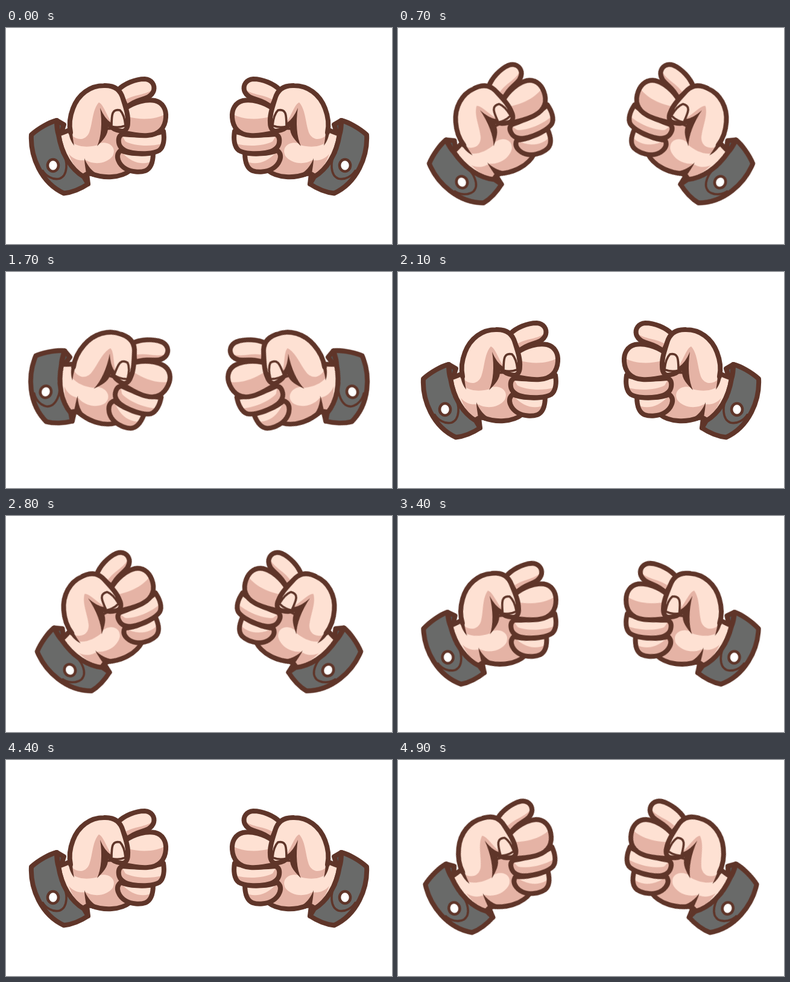
Recreate the animation shown at these times as an HTML page. Size 640 by 360 pixels, loop 5000 ms.

```html
<!DOCTYPE html>
<html lang="en">
<head>
<meta charset="utf-8">
<title>Two fists</title>
<style>
  html, body { margin: 0; width: 100%; height: 100%; overflow: hidden; background: #fff; }
  svg { display: block; width: 100vw; height: 100vh; }
  .ink { fill: none; stroke: #5f3529; stroke-width: 8; stroke-linejoin: round; stroke-linecap: round; }
  .thin { stroke-width: 3.6; }
  .crease { fill: #5f3529; }
  .light { fill: #fee1d3; }
  .shade { fill: #e5b3a5; }
  .cuff { fill: #696a69; }
  .lining { fill: #555554; }
  .button { fill: #fff; stroke: #5f3529; stroke-width: 4.6; }

  /* The small negative delay keeps samples off the step edges. */
  .fist { transform-origin: 155px 180px; animation: shake 5s -1ms infinite; }

  /* Wind up, slam down, hold, ease back: 5 degrees per 100 ms, slam 15. */
  @keyframes shake {
    0%, 46%  { transform: rotate(0deg);   animation-timing-function: steps(6, end); }
    12%, 58% { transform: rotate(-30deg); animation-timing-function: steps(6, end); }
    24%, 70% { transform: rotate(0deg);   animation-timing-function: steps(2, end); }
    28%, 74% { transform: rotate(30deg);  animation-timing-function: step-end; }
    30%, 76% { transform: rotate(30deg);  animation-timing-function: steps(6, end); }
    42%, 88% { transform: rotate(0deg);   animation-timing-function: step-end; }
    92%      { transform: rotate(0deg);   animation-timing-function: steps(4, end); }
    100%     { transform: rotate(-20deg); }
  }
</style>
</head>
<body>
<svg viewBox="0 0 640 360">
  <g class="fist" id="left"></g>
  <g transform="matrix(-1 0 0 1 640 0)"><g class="fist" id="right"></g></g>
</svg>
<script>
  const path = (cls, d) => `<path class="${cls}" d="${d}"/>`;

  // Filled shape, inner tones, then the outline on top.
  const part = (fill, d, inner = '') => path(fill, d) + inner + path('ink', d);
  const finger = (d, light) => part('shade', d, path('light', light));

  const lining =
    part('lining', 'M84 154L96 161L92 174L86 178Z') +
    part('lining', 'M116 236L134 243L136 260L128 250Z');

  const palm = part('light',
    'M87 177C96 174 102 172 108 168L190 165L205 238C190 250 162 251 142 243' +
    'C136 242 131 244 128 248C108 236 92 210 87 177Z',
    path('shade', 'M155 192C172 188 184 200 177 213C168 226 146 229 132 220L138 243' +
      'C165 252 195 248 205 238L196 172L160 150Z') +
    path('shade', 'M104 210C112 219 122 222 132 220L138 243L129 248C117 238 109 224 104 210Z')) +
    path('crease', 'M130 217C134 227 139 235 150 243L144 248L133 243C132 234 130 226 130 217Z');

  const cuff = part('cuff',
    'M84 154C72 157 54 167 42 178C40 214 58 258 96 275.5C110 274 124 268 136 260' +
    'L129 248C108 236 92 210 87 178C85 172 84 162 84 154Z',
    path('ink thin', 'M93 208C104 222 102 246 89 251C77 254 66 246 61 238')) +
    '<ellipse class="button" cx="78" cy="229" rx="9" ry="10"/>';

  const index = finger(
    'M186 103C196 93 214 85 230 85C242 86 247 95 245 104C242 114 232 117 222 120C212 123 206 127 200 132Z',
    'M187 104C200 93 214 86 230 86C241 87 246 94 244 101C236 111 216 110 199 119C196 112 192 107 187 104Z');
  const middle = finger(
    'M198 134C212 124 232 118 247 121C260 124 266 136 265 149C264 166 254 178 235 179C222 180 210 178 194 174Z',
    'M199 134C212 124 232 119 247 122C259 125 265 134 264 143C252 152 225 154 203 148Z');
  const ring = finger(
    'M193 177C210 179 240 180 261 172C263 184 262 198 254 204C245 210 225 210 210 208C196 206 188 199 187 191C186 184 188 179 193 177Z',
    'M192 179C210 181 240 182 261 174C263 184 261 190 258 193C240 198 212 197 198 189Z');
  const pinky = finger(
    'M190 204C205 210 228 211 244 208C244 222 241 234 231 238C222 241 208 240 199 235C188 229 179 213 190 204Z',
    'M191 206C205 212 226 213 243 210C243 218 240 222 237 224C222 228 206 223 191 206Z');

  // Outer curve of the thumb, from its base over the top to the tip.
  const rim = 'M107 174C104 160 106 147 111 134C120 110 140 96 162 96C180 95 190 103 194 118' +
    'C199 134 203 146 202 158C202 167 198 172 192 172C183 171 175 167 170 160';
  const thumb =
    path('light', rim + 'L155 128L152 194C138 200 122 200 112 192Z') +
    path('shade', 'M108 178C118 188 132 188 138 174C144 158 143 136 154 124C162 128 167 146 176 159' +
      'L184 171L168 165L152 195C138 199 122 199 112 192Z') +
    path('ink', rim) +
    path('crease', 'M103.5 168C104 180 107 188 113 196C111 187 110 178 110 168Z') +
    path('crease', 'M156 133C161 145 167 153 174 158L169 165C170 178 160 188 151 197C158 182 160 158 156 133Z') +
    path('light', 'M175 164L177 142Q180 136 189 137Q195 144 198 163L186 165Z') +
    path('ink thin', 'M175 164C175 155 175 147 177 142C179 137 184 136 189 137C194 142 197 152 198 162M175 164Q186 167 197 163');

  const fist = lining + palm + cuff + index + pinky + ring + middle + thumb;
  for (const id of ['left', 'right']) document.getElementById(id).innerHTML = fist;
</script>
</body>
</html>
```
